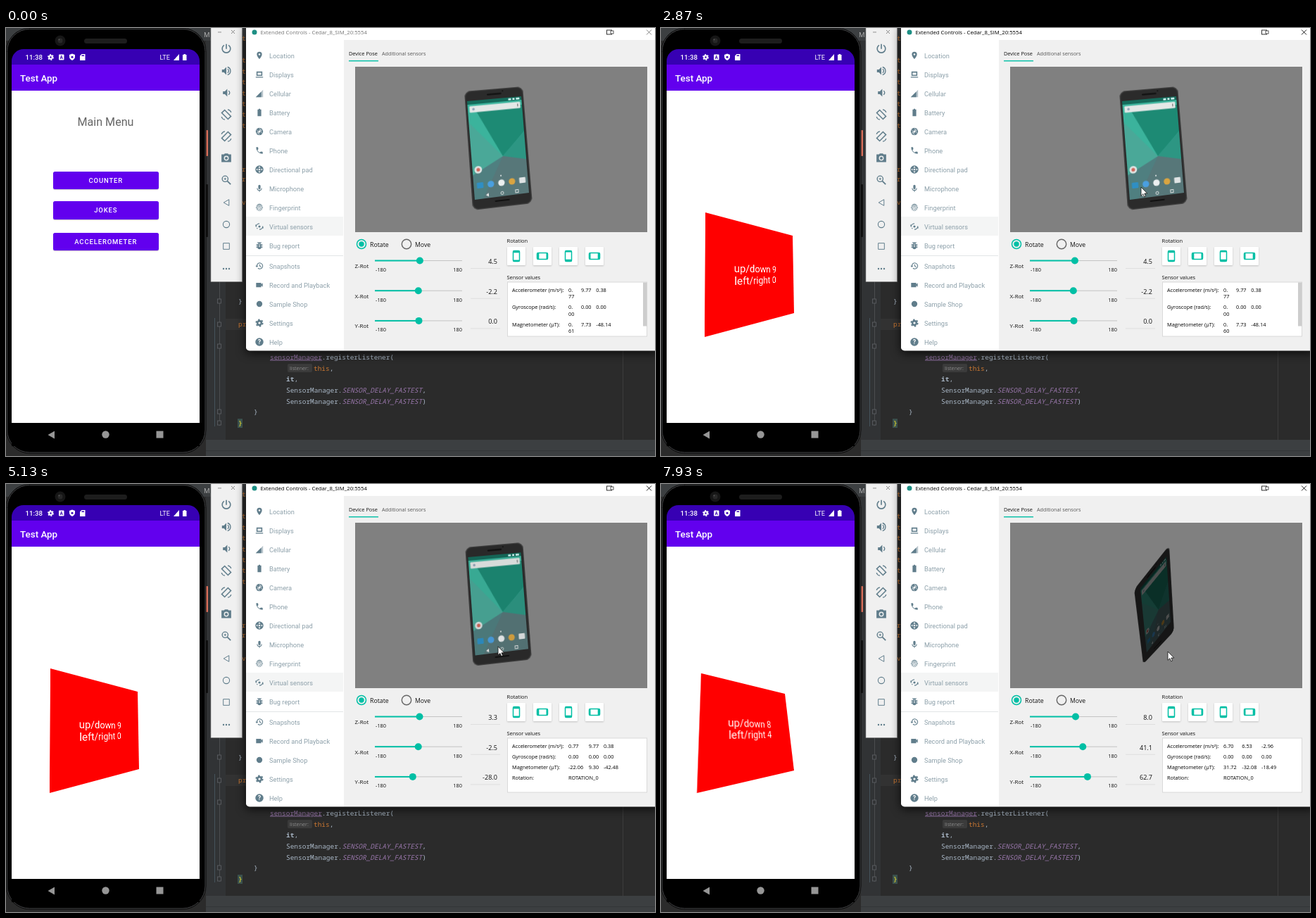
An HTML page that plays this animation: 922 by 608 pixels, repeating every 8000 ms.

```html
<!DOCTYPE html>
<html lang="en">
<head>
<meta charset="utf-8">
<title>Device pose</title>
<style>
html,body{margin:0;width:100%;height:100%;overflow:hidden;background:#2b2b2b}
#stage{position:fixed;inset:0;overflow:hidden;contain:strict}
svg,.layer{position:absolute;left:0;top:0;width:922px;height:608px}
svg{overflow:hidden}
svg text{white-space:pre}
.abs{position:absolute;left:0;top:0;transform-origin:0 0}
#app{background:#000;overflow:hidden;clip-path:inset(30px 647px 47px 8px round 17px 17px 0 0)}
.win{transform-origin:141px 312px}
.win div{position:absolute;font-family:Roboto,sans-serif}
.status{left:8px;top:29px;width:267px;height:23px;background:#3700b3}
.bar{left:8px;top:51.5px;width:255px;height:37.5px;padding-left:12px;background:#6200ee;color:#fff;font:500 13.4px/39px Roboto,sans-serif}
.page{left:8px;top:88px;width:267px;height:506px;background:#fff}
.head{left:8px;top:121.5px;width:267px;text-align:center;color:#666;font-size:16.1px;line-height:23px}
.btn{left:66.5px;width:150.5px;height:25.5px;border-radius:2.5px;background:#6200ee;color:#fff;text-align:center;font-weight:500;font-size:9.5px;line-height:25.5px;letter-spacing:.85px;box-shadow:0 1px 1px #0003}
#red{left:0;top:0;width:136px;height:136px;background:#f00;transform-origin:0 0}
#label{left:-2px;top:53px;width:134px;color:#fff;text-align:center;font-size:14px;line-height:16px;white-space:pre}
#body{width:85px;height:170px;border-radius:9px;background:#2b2b2b;box-shadow:inset 0 0 0 1.3px #424242;overflow:hidden}
#screen{width:77px;height:138px;overflow:hidden}
#body svg{width:85px;height:170px}
#screen svg{width:77px;height:138px}
.shade{position:absolute;inset:0;background:#000}
</style>
</head>
<body>
<div id="stage">
  <svg id="base"></svg>
  <div id="app" class="layer">
    <div id="menu" class="win layer"></div>
    <div id="detail" class="win layer"></div>
  </div>
  <div id="body" class="abs"></div>
  <div id="screen" class="abs"></div>
  <svg id="top"></svg>
</div>
<script>
const $ = id => document.getElementById(id);
const SANS = "'Open Sans','Noto Sans',sans-serif", ROBOTO = "Roboto,sans-serif",
      MONO = "'Noto Sans Mono','DejaVu Sans Mono',monospace";
const SLATE = '#607d8b', TEAL = '#00bfa5';
const text = (x, y, s, size, fill, font = SANS, more = '') =>
  `<text x="${x}" y="${y}" font-size="${size}" fill="${fill}" font-family="${font}" ${more}>${s}</text>`;
const rect = (x, y, w, h, fill, more = '') =>
  `<rect x="${x}" y="${y}" width="${w}" height="${h}" fill="${fill}" ${more}/>`;
const dot = (x, y, r, fill, more = '') => `<circle cx="${x}" cy="${y}" r="${r}" fill="${fill}" ${more}/>`;
const path = (d, more = '') => `<path d="${d}" ${more}/>`;
// 24-unit icon centred on x, y
const icon = (x, y, size, inner, fill = SLATE) =>
  `<g transform="translate(${x - size / 2} ${y - size / 2}) scale(${size / 24})" fill="${fill}" fill-rule="evenodd">${inner}</g>`;
const line = (d, w = 2, c = SLATE) => path(d, `fill="none" stroke="${c}" stroke-width="${w}"`);
const gear = c => dot(12, 12, 5.5, 'none', `stroke="${c}" stroke-width="5"`) +
  dot(12, 12, 9, 'none', `stroke="${c}" stroke-width="3.4" stroke-dasharray="4.7 4.725"`);

// ---- editor
function editor() {
  let s = rect(0, 0, 922, 608, '#2b2b2b') + rect(284, 0, 28, 608, '#313335') + rect(312, 413, 610, 16, '#323232') +
    rect(0, 0, 341, 18, '#3c3f41') + rect(284, 585, 638, 23, '#3c3f41') + rect(284, 600, 638, 1, '#323537') +
    rect(876, 458, 1, 127, '#3d3d3d') + rect(303, 360, 1, 205, '#4b4d4f') + rect(296, 412, 1, 154, '#45545c') +
    text(281, 13, 'M', 9.5, '#bbb');
  for (const y of [388, 421, 452, 545, 561])
    s += rect(300.5, y - 3, 5, 6, '#313335', 'stroke="#606366" stroke-width=".8"');
  const code = (x, y, str, c = '#a9b7c6') => text(x, y, str, 9.48, c, MONO);
  const key = '#cc7832';
  for (const y of [18, 49, 65, 80, 96, 111, 126, 142]) s += code(335, y, 't', key);
  for (const y of [204, 218]) s += code(335, y, 'r', key);
  s += code(335, 251, 'v', key) + code(330, 392, '}') + code(330, 424, 'pr', key) +
    code(375, 470.5, '<tspan fill="#9876aa" text-decoration="underline">sensorManager</tspan>.registerListener(') +
    rect(400, 477, 35, 12, '#3b3b3b', 'rx="2"') + text(403, 486, 'listener:', 7.2, '#8a8a8a') +
    code(437, 486.5, 'this<tspan fill="#a9b7c6">,</tspan>', key) + code(398, 501.5, '<tspan font-weight="700">it</tspan>,');
  [',', ')'].forEach((end, i) => s += code(398, 517.5 + 16 * i,
    `SensorManager.<tspan fill="#9876aa" font-style="italic">SENSOR_DELAY_FASTEST</tspan>${end}`));
  return s + code(352, 549, '}') + rect(329, 555, 7, 13, '#3b514d') + code(330, 564.5, '}', '#ffef28');
}

// ---- emulator body
function handset() {
  return rect(284, 145, 3, 37, '#d9705c', 'rx="1"') + rect(284, 222, 3, 75, '#111', 'rx="1"') +
    rect(0, 0, 284.5, 604.5, '#060606', 'rx="34"') +
    rect(1.5, 1.5, 281.5, 601.5, '#000', 'rx="32" stroke="#454648"') +
    rect(111, 15, 61, 7, '#1d1d1d', 'rx="3.5"') + dot(77, 18, 7.5, '#161616') + dot(77, 18, 3.5, '#282828') +
    dot(75.5, 16.5, 1, '#555');
}

// ---- tool strip
const speaker = 'M3 9v6h4l5 5V4L7 9z';
const tilt = line('M8.5 2.5L21.5 15.5 15.5 21.5 2.5 8.5z', 2.2) + line('M15 1.5a9 9 0 0 1 7 6M9 22.500a9 9 0 0 1-7-6', 1.8);
const tools = [
  line('M12 3v10M7.5 5.2a8.5 8.5 0 1 0 9 0', 2.4),
  path(speaker) + line('M14.5 8a4.5 4.5 0 0 1 0 8M14.5 4a8.3 8.3 0 0 1 0 16'),
  path(speaker, 'transform="translate(2)"') + line('M16.5 8a4.5 4.5 0 0 1 0 8'),
  tilt,
  `<g transform="matrix(-1 0 0 1 24 0)">${tilt}</g>`,
  path('M9 2L7.2 4H2v16h20V4h-5.2L15 2zM12 17a5 5 0 1 1 0-10 5 5 0 0 1 0 10z') + dot(12, 12, 3, SLATE),
  dot(9.5, 9.5, 6, 'none', `stroke="${SLATE}" stroke-width="2"`) + line('M14 14l7 7', 2.6) + line('M7 9.5h5M9.5 7v5', 1.4),
  line('M19 4v16L5 12z', 1.8),
  dot(12, 12, 8.5, 'none', `stroke="${SLATE}" stroke-width="2"`),
  line('M4 4h16v16H4z', 1.8),
  dot(4, 12, 2.4, SLATE) + dot(12, 12, 2.4, SLATE) + dot(20, 12, 2.4, SLATE)
];
function strip() {
  const ys = [29, 61, 92, 123, 154, 185, 216, 248, 279, 310, 342];
  return rect(291, -4, 44.5, 364.5, '#f0f0f0', 'stroke="#888" stroke-width=".6"') + rect(301, 5.5, 5, .9, '#888') +
    path('M320 3l5 5m0-5l-5 5', 'id="stripX" stroke-width=".9"') +
    tools.map((g, i) => icon(313, ys[i], i > 6 && i < 10 ? 13 : i == 10 ? 12 : 16.5, g)).join('');
}

// ---- control window
const menu = [
  ['Location', path('M12 2a7 7 0 0 0-7 7c0 5.3 7 13 7 13s7-7.7 7-13a7 7 0 0 0-7-7zm0 9.5a2.5 2.5 0 1 1 0-5 2.5 2.5 0 0 1 0 5z')],
  ['Displays', path('M4 4h16v12H4zM7 7v6h10V7zM2 18h20v2.5H2z')],
  ['Cellular', path('M2 22h20V2z', 'opacity=".45"') + path('M2 22h15V7z')],
  ['Battery', path('M17 4h-3V2h-4v2H7v18h10z')],
  ['Camera', dot(12, 12, 6.5, 'none', `stroke="${SLATE}" stroke-width="7"`) +
    line('M12 2l5 9M21 8h-10M20 18l-5-9M12 22l-5-9M3 16h10M4 6l5 9', 1, '#fff')],
  ['Phone', path('M6.6 10.8a15 15 0 0 0 6.6 6.6l2.2-2.2a1 1 0 0 1 1-.25q1.7.57 3.6.57a1 1 0 0 1 1 1V20a1 1 0 0 1-1 1A17 17 0 0 1 3 4a1 1 0 0 1 1-1h3.5a1 1 0 0 1 1 1q0 1.9.57 3.6a1 1 0 0 1-.25 1z')],
  ['Directional pad', dot(12, 12, 11, SLATE) + path('M12 3l3 4H9zM12 21l3-4H9zM3 12l4-3v6zM21 12l-4-3v6z', 'fill="#fff"') + dot(12, 12, 2.5, '#fff')],
  ['Microphone', path('M12 14a3 3 0 0 0 3-3V5a3 3 0 0 0-6 0v6a3 3 0 0 0 3 3z') + line('M6 11a6 6 0 0 0 12 0M12 17v4')],
  ['Fingerprint', line('M4 8a9 9 0 0 1 16 0M3 14a9 8 0 0 1 18 0M6 19c-2-9 2-11 6-11s8 3 6 11M9 21c-3-8 0-10 3-10s5 3 3 10M12 14v8M7 4a10 10 0 0 1 10 0', 1.4)],
  ['Virtual sensors', dot(12, 12, 3, SLATE) + line('M3 13a9 9 0 0 1 9-9M21 11a9 9 0 0 1-9 9M2 7l1 6M22 17l-1-6M7 18l-2-2', 2.2)],
  ['Bug report', path('M7 8h10v9a5 5 0 0 1-10 0zM10 10v2h4v-2zM10 14v2h4v-2zM8 7a4 4 0 0 1 8 0z') + line('M3.5 9h17M3.5 13h17M3.5 17h17M7 3l3 3M17 3l-3 3')],
  ['Snapshots', line('M5 12a8 8 0 1 1 3 6.2M13 7.5v5l4 2.3') + path('M1 11.5h8l-4 4.5z')],
  ['Record and Playback', path('M17 10.5V6H3v12h14v-4.5l4 4v-11z')],
  ['Sample Shop', dot(12, 12, 8, SLATE)],
  ['Settings', gear(SLATE)],
  ['Help', dot(12, 12, 11, SLATE) + text(12, 18, '?', 17, '#fff', ROBOTO, 'text-anchor="middle" font-weight="700"')]
];
const rowY = i => i < 11 ? 39 + 27 * i : 338 + 27 * (i - 11);
function controls() {
  let s = rect(341, -6, 588, 464.5, '#f0f0f0', 'rx="5" style="filter:drop-shadow(0 3px 7px #000c)"') +
    rect(341, 0, 581, 17, '#fff') + path('M341 10H480V458H346a5 5 0 0 1-5-5z', 'fill="#fff"') +
    rect(341, 268, 138, 27, '#f4f5f5') + rect(341, 323, 138, 1, '#e2e5e6') + dot(353, 6, 3.5, '#1d8f84') +
    text(361.5, 9, 'Extended Controls - Cedar_8_SIM_20:5554', 7.75, '#000', SANS, 'id="title"') +
    rect(853.5, 3, 7, 6, 'none', 'stroke="#333"') + rect(859, 4, 4, 4, '#fff', 'stroke="#333" stroke-width=".8"') +
    path('M910 2.5l7 7m0-7l-7 7', 'id="close" stroke-width=".9"');
  menu.forEach(([name, g], i) => s += icon(360, rowY(i), 12.5, g) + text(374, rowY(i) + 3.7, name, 9.25, '#8da0aa', ROBOTO));
  s += text(487, 39, 'Device Pose', 7.35, '#111') + text(534, 39, 'Additional sensors', 7.25, '#555') +
    rect(487, 46, 42, 1.4, TEAL) + rect(496, 55, 415, 235, '#808080') +
    dot(505, 307, 6.5, 'none', `stroke="${TEAL}" stroke-width="1.5"`) + dot(505, 307, 3.7, TEAL) +
    dot(569, 307, 6.7, 'none', 'stroke="#666" stroke-width="1.4"') +
    text(517, 310.5, 'Rotate', 8.8, '#111') + text(581, 310.5, 'Move', 8.7, '#111');
  [...'ZXY'].forEach((axis, i) => {
    const y = 330.5 + 42.7 * i;
    s += text(495.5, y + 10.5, axis + '-Rot', 8, '#111') + rect(524, y - .5, 124, 1, '#c4c4c4') +
      rect(524, y - 1, 60, 2, TEAL, `id="fill${i}"`) + dot(586, y, 5, TEAL, `id="knob${i}"`) +
      text(525, y + 15.5, '-180', 7.4, '#111') + text(648, y + 15.5, '180', 7.4, '#111', SANS, 'text-anchor="end"') +
      text(698, y + 4.5, '', 9.1, '#111', SANS, `id="val${i}" text-anchor="end"`) + rect(660, y + 10.5, 42, 1, '#dedede');
  });
  s += text(711.5, 305, 'Rotation', 7.5, '#111') + text(711.5, 357, 'Sensor values', 7.4, '#111');
  for (let i = 0; i < 4; i++) {
    const x = 712 + 37 * i;
    s += rect(x, 311, 26, 26, '#fff', 'rx="1" style="filter:drop-shadow(0 1px 1px #0003)"') +
      `<g transform="translate(${x + 13} 324) rotate(${-90 * i})">` +
      rect(-4.5, -7.5, 9, 15, 'none', `rx="1.5" stroke="${TEAL}" stroke-width="1.5"`) +
      rect(-4.5, -7.5, 9, 2.8, TEAL) + rect(-4.5, 5.5, 9, 2, TEAL) + '</g>';
  }
  return s + rect(712.5, 361, 198, 77, '#fff', 'stroke="#d9d9d9"') + '<g id="sensors"></g>';
}

// ---- top layer: status icons, navigation, pointer
function overlay() {
  const w = '#fff', nav = '#969696';
  return text(27.5, 44.8, '11:38', 9.6, w, ROBOTO, 'font-weight="500"') + icon(63.5, 41.5, 10, gear(w), w) +
    rect(75, 37.5, 7.5, 8, w, 'rx="1"') + text(78.7, 44.2, 'A', 6.5, '#3700b3', ROBOTO, 'text-anchor="middle" font-weight="700"') +
    path('M94 36.5l4 1.6v3q0 3.2-4 5-4-1.8-4-5v-3z', 'fill="#fff"') + dot(94, 41.2, 1.5, '#3700b3') +
    path('M107.5 37h5v9h-7.5v-6.5z', 'fill="#fff"') + rect(107.5, 38.5, 3.5, 1.5, '#3700b3') +
    text(218.5, 44.7, 'LTE', 9.2, w, ROBOTO) + path('M238 46h8v-9z', 'fill="#fff"') +
    path('M251 38h1.5v-1h2.5v1h1.5v8h-5.5z', 'fill="#fff"') + rect(8, 561, 267, 33, '#000') +
    path('M69 572.5v11l-9.5-5.5z', `fill="${nav}"`) + dot(141.5, 577.5, 5.2, nav) + rect(213.5, 572.5, 10, 10, nav) +
    path('M0 0V12.3L2.9 9.7 4.7 13.8 6.6 13 4.9 9H8.8z', 'id="mouse" fill="#fff" stroke="#111" stroke-width=".8"');
}

// ---- posed phone
function wallpaper() {
  const poly = (d, c) => path(d, `fill="${c}"`);
  let s = rect(0, 0, 77, 138, '#4f7f80') + poly('M0 0H77V62L44 82 0 96z', '#3bb39c') + poly('M0 30L44 82 0 104z', '#4aa898') +
    poly('M10 12H77V50L44 82z', '#1d8a74') + poly('M44 82L77 50V90z', '#2d9683') + poly('M44 82L77 90V138H12z', '#577779') +
    rect(2.5, 7.5, 72, 9, '#e4e8e7', 'rx="1"') + dot(8, 12, 1.8, '#8fa0b8') + rect(70, 10, 1.5, 4, '#888') +
    rect(0, 0, 77, 5, '#156b5b') + rect(58, 1.5, 4, 2.5, '#dff') + rect(64, 1.5, 3, 2.5, '#dff') + rect(69, 1.5, 5, 2.5, '#dff') +
    dot(8, 97, 5.3, '#dde3e2') + dot(8, 97, 2.5, '#d0665a') + dot(39, 109, .9, '#fff');
  ['#2f8fc4', '#4a9fe0', '#eceff0', '#d9a441', '#dfe3e4'].forEach((c, i) => {
    const x = 9 + 15 * i;
    s += i % 4 ? dot(x, 119, 4.6, c) : rect(x - 4.5, 115, 9, 8, c, 'rx="1"');
  });
  return `<svg>${s}${path('M20 131v5l-4-2.5z', 'fill="#eee"')}${dot(39, 133.5, 2, 'none', 'stroke="#eee" stroke-width=".9"')}` +
    `${rect(58, 131.5, 4, 4, 'none', 'stroke="#eee" stroke-width=".9"')}</svg><div class="shade"></div>`;
}

const frame = inner => `<div class="page"></div><div class="status"></div><div class="bar">Test App</div>${inner}`;
const btn = (y, s, id = '') => `<div class="btn" ${id} style="top:${y}px">${s}</div>`;
$('base').innerHTML = editor() + handset() + strip() + controls();
$('menu').innerHTML = frame('<div class="head">Main Menu</div>' + btn(203.5, 'COUNTER') + btn(246, 'JOKES') + btn(290.5, 'ACCELEROMETER', 'id="press"'));
$('detail').innerHTML = frame('<div id="red"><div id="label"></div></div>');
$('body').innerHTML = '<svg>' + rect(32, 6.5, 21, 2.2, '#111', 'rx="1"') + dot(55, 4, 1, '#111') +
  rect(32, 160, 21, 2, '#111', 'rx="1"') + '</svg><div class="shade"></div>';
$('screen').innerHTML = wallpaper();
$('top').innerHTML = overlay();

// ---- motion
const clamp = v => Math.min(1, Math.max(0, v));
const smooth = p => p * p * (3 - 2 * p);
function at(keys, t, ease = p => p) {
  let i = 0;
  while (i < keys.length - 2 && t >= keys[i + 1][0]) i++;
  const [t0, a] = keys[i], [t1, b] = keys[i + 1], p = ease(clamp((t - t0) / (t1 - t0)));
  return a.map((v, k) => v + (b[k] - v) * p);
}
// maps a w by h box onto corners TL, TR, BR, BL
function warp(el, w, h, [x0, y0, x1, y1, x2, y2, x3, y3]) {
  const sx = x0 - x1 + x2 - x3, sy = y0 - y1 + y2 - y3, ax = x1 - x2, bx = x3 - x2, ay = y1 - y2, by = y3 - y2,
    det = ax * by - bx * ay, g = (sx * by - bx * sy) / det, k = (ax * sy - sx * ay) / det;
  el.style.transform = 'matrix3d(' + [(x1 - x0 + g * x1) / w, (y1 - y0 + g * y1) / w, 0, g / w,
    (x3 - x0 + k * x3) / h, (y3 - y0 + k * y3) / h, 0, k / h, 0, 0, 1, 0, x0, y0, 0, 1].map(v => v.toFixed(8)) + ')';
}

const mouse = [[267, [912, 590]], [1067, [170, 325]], [1133, [169, 324]], [1333, [157, 311]], [2000, [157, 311]],
  [2800, [682, 226]], [2867, [682, 226]], [3333, [663, 218]], [3533, [657, 217]], [4000, [657, 217]], [4333, [726, 276]],
  [4733, [684, 222]], [4867, [684, 222]], [5667, [742, 256]], [6200, [742, 256]], [6400, [766, 276]], [6733, [712, 208]],
  [7067, [712, 208]], [7533, [723, 244]], [7800, [723, 244]], [7933, [720, 238]]];

// body corners, screen corners, shade
const front = [651, 90, 734, 83, 748, 249, 663, 259, 655, 104, 732, 97, 743, 234, 666, 244, 0],
  left = [657, 90, 735, 82, 743, 250, 666, 258, 662, 104, 729, 98, 738, 235, 669, 242, .27],
  right = [658, 91, 721, 84, 744, 249, 681, 259, 668, 104, 719, 99, 738, 230, 688, 238, .43],
  back = [672, 150, 722, 87, 729, 209, 685, 256, 681, 148, 718, 103, 724, 196, 690, 239, .66];
const pose = [[2867, front], [3470, left], [4867, left], [5200, front], [5667, right], [7067, right], [7533, back]];

const flat = [63, 262, 187, 295, 189, 405, 62, 439], turned = [64, 261, 189, 294, 190, 405, 64, 438],
  tipped = [57, 269, 176, 298, 189, 407, 51, 439];
const card = [[5667, flat], [6000, turned], [7067, turned], [7533, tipped]];

// z, x, y rotation; accelerometer; gyroscope y; magnetometer
const low = [3.3, -2.5, -28, .77, 9.77, .38, 0, -22.06, 9.3, -42.48],
  high = [13.1, -15.4, 47.4, .27, 9.65, 1.76, 0, 36.52, 10.55, -30.53];
const readings = [[2867, [4.5, -2.2, 0, .77, 9.77, .38, 0, .61, 7.73, -48.14]],
  [3333, [3.6, -2.4, -23, .77, 9.77, .38, 0, -18.26, 9.07, -44.29]], [3533, low], [5533, low],
  [5667, [3.5, -2.4, -25, .77, 9.77, .38, .01, -19.8, 9.16, -43.61]], [6000, high], [7067, high],
  [7533, [8, 41.1, 62.7, 6.7, 6.53, -2.96, 0, 31.72, -32.08, -18.49]]];

const width = s => 7.35 * [...s].reduce((w, c) => w + (c == '.' ? .266 : c == '-' ? .322 : .572), 0);
function sensorTable(v, wrapped) {
  const rows = [['Accelerometer (m/s²):', v.slice(3, 6)], ['Gyroscope (rad/s):', [0, v[6], 0]], ['Magnetometer (µT):', v.slice(7)]]
    .map(([n, a]) => [n, a.map(x => x.toFixed(2))]);
  const put = (x, y, s) => text(x, y, s, 7.35, '#000');
  const wide = k => Math.max(...rows.map(r => width(r[1][k])));
  const c1 = wrapped ? 817 : 799 + wide(0) + 7.5, c2 = c1 + wide(1) + 6.7;
  let s = '';
  rows.forEach(([name, [a, b, c]], i) => {
    const y = 375 + (wrapped ? 24.4 : 15) * i;
    s += put(719, y, name) + put(c1, y, b) + put(c2, y, c);
    s += wrapped ? put(799, y, a.slice(0, 2)) + put(799, y + 9.3, a.slice(2)) : put(799, y, a);
  });
  return s + (wrapped ? rect(905, 361.5, 5.5, 62, '#cdcdcd') : put(719, 420, 'Rotation:') + put(799, 420, 'ROTATION_0'));
}

let shown = '';
function draw(ms) {
  const step = 1000 / 15, t = Math.floor((ms + 5) / step) * step + .5;
  const [mx, my] = at(mouse, t, smooth);
  $('mouse').setAttribute('transform', `translate(${mx} ${my})`);
  $('mouse').style.display = t < 266 ? 'none' : '';

  const p = clamp((t - 1533) / 467), open = 1 - (1 - p) ** 2.4;
  $('press').style.background = t > 1400 ? '#8133f1' : '#6200ee';
  $('menu').style.transform = `scale(${1 + .12 * open})`;
  $('detail').style.transform = `scale(${.85 + .15 * open})`;
  $('detail').style.opacity = clamp((t - 1533) / 133);
  $('menu').style.visibility = t > 1690 ? 'hidden' : 'visible';
  warp($('red'), 136, 136, at(card, t));
  const side = Math.floor(4 * clamp((t - 7067) / 466));
  $('label').textContent = `up/down ${t > 7300 ? 8 : 9}\nleft/right ${side}`;

  const q = at(pose, t);
  warp($('body'), 85, 170, q.slice(0, 8));
  warp($('screen'), 77, 138, q.slice(8, 16));
  $('body').lastChild.style.opacity = q[16] * .75;
  $('screen').lastChild.style.opacity = q[16];

  const v = at(readings, t);
  for (let i = 0; i < 3; i++) {
    const x = 586.5 + .31 * v[i];
    $('knob' + i).setAttribute('cx', x);
    $('fill' + i).setAttribute('width', x - 524);
    $('val' + i).textContent = v[i].toFixed(1).replace(/^-0\.0$/, '0.0');
  }
  const table = sensorTable(v, t < 2900);
  if (table != shown) $('sensors').innerHTML = shown = table;

  const ink = t > 2700 ? '#000' : '#777';
  $('title').setAttribute('fill', ink);
  $('close').setAttribute('stroke', ink);
  $('stripX').setAttribute('stroke', t > 1400 && t < 2700 ? '#333' : '#777');
}

const start = performance.now();
(function loop() {
  draw((performance.now() - start) % 8000);
  requestAnimationFrame(loop);
})();
</script>
</body>
</html>
```
